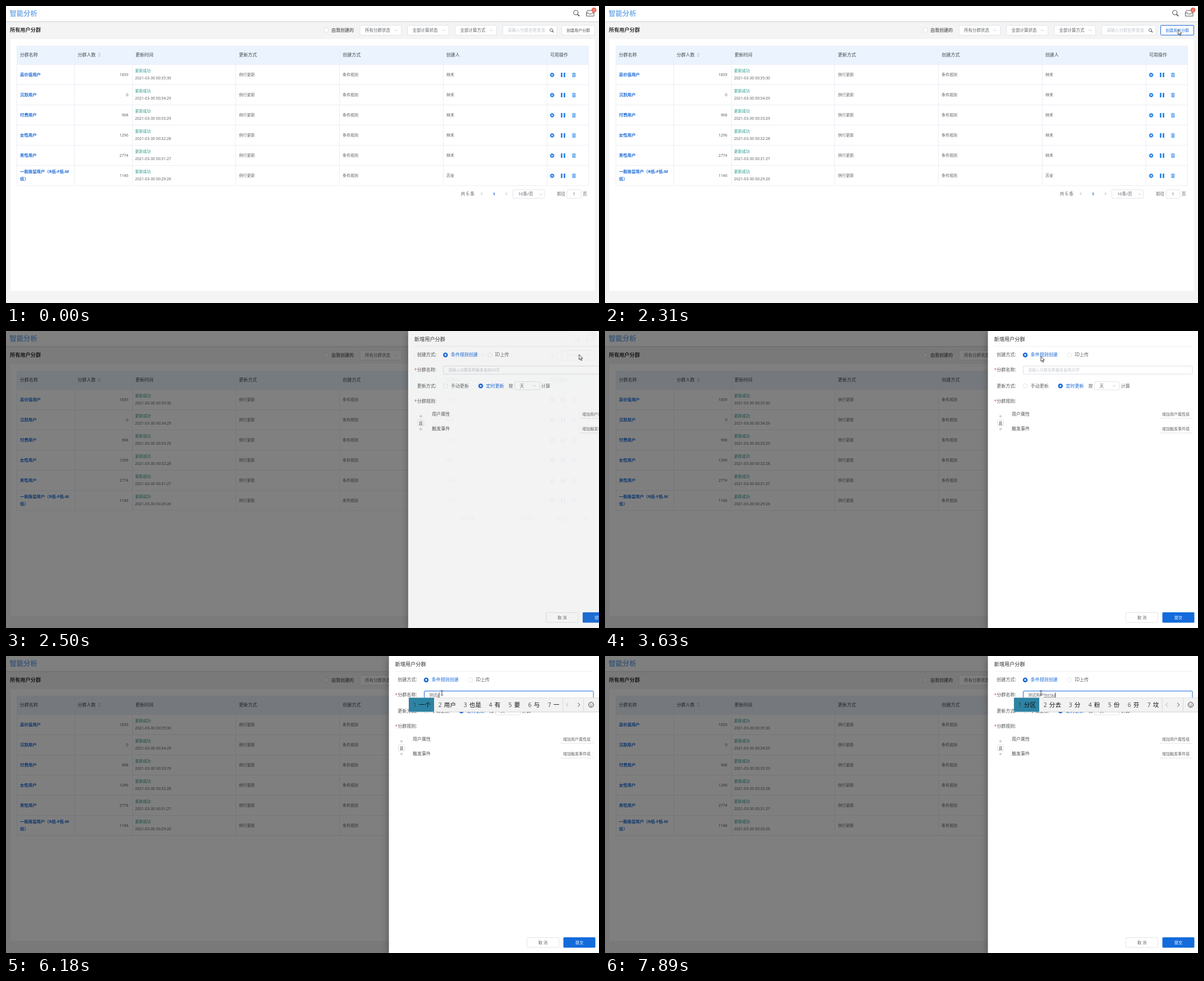
An HTML page for the animation above (8000 ms loop, 1057x530 px).

```html
<!DOCTYPE html>
<html lang="zh-CN">
<head>
<meta charset="utf-8">
<title>智能分析</title>
<style>
html, body { margin: 0; width: 100%; height: 100%; overflow: hidden; background: #f4f4f4; }
svg { display: block; width: 1057px; height: 530px; }
text { font-family: "Noto Sans", "Noto Sans CJK SC", "Noto Sans CJK", sans-serif; white-space: pre; }
.loop { animation: 8s linear infinite; }
#shade { animation-name: shade; }
#drawer { animation-name: drawer; }
#sheet { filter: drop-shadow(0 3px 7px rgba(0, 0, 0, .35)); }
#create rect { animation-name: hover-border; }
#create text { animation-name: hover-text; }
#field { animation-name: focus; }
#arrow { animation-name: arrow; }
#beam { animation-name: beam; }
@keyframes shade {
  0%, 29.04% { opacity: 0; animation-timing-function: ease; }
  31.4%, 100% { opacity: .5; }
}
@keyframes drawer {
  0%, 29.04% { opacity: 0; transform: translateX(375px); animation-timing-function: ease; }
  32.53%, 100% { opacity: 1; transform: none; }
}
@keyframes hover-border {
  0%, 15.2% { stroke: #e1e4e9; }
  16.4%, 100% { stroke: #1a6ad8; }
}
@keyframes hover-text {
  0%, 15.2% { fill: #505256; }
  16.4%, 100% { fill: #1a6ad8; }
}
@keyframes focus {
  0%, 48.9% { stroke: #dcdfe6; animation-timing-function: ease; }
  51.4%, 100% { stroke: #1a6ad8; }
}
@keyframes arrow {
  0%, 1.25% { transform: translate(1037px, 531px); }
  7% { transform: translate(1059px, 384px); }
  11.1% { transform: translate(1059px, 89px); animation-timing-function: ease-out; }
  17.6%, 32.4% { transform: translate(1021.5px, 42px); }
  35% { transform: translate(997px, 57px); animation-timing-function: ease-in-out; }
  40.9%, 45% { transform: translate(777px, 43px); opacity: 1; }
  48.5% { transform: translate(777px, 62px); opacity: 1; }
  48.51%, 100% { transform: translate(777px, 62px); opacity: 0; }
}
@keyframes beam {
  0%, 48.5% { opacity: 0; }
  48.51%, 100% { opacity: 1; }
}
</style>
</head>
<body>
<svg id="stage" viewBox="0 0 1057 530"></svg>
<script>
const BLUE = '#1a6ad8', DARK = '#303133', GRAY = '#606266', PALE = '#c0c4cc', LINE = '#ebeef5', EDGE = '#e1e4e9';

// y is the vertical middle of the text
const text = (x, y, s, size = 7, fill = GRAY, attrs = '') =>
  `<text x="${x}" y="${(y + size * .37).toFixed(2)}" font-size="${size}" fill="${fill}" ${attrs}>${s}</text>`;
const rect = (x, y, w, h, fill = '#fff', attrs = '') =>
  `<rect x="${x}" y="${y}" width="${w}" height="${h}" fill="${fill}" ${attrs}/>`;
const box = (x, y, w, h, attrs = '') => rect(x, y, w, h, '#fff', `rx="1.5" stroke="${EDGE}" ${attrs}`);
const circle = (x, y, r, fill, attrs = '') => `<circle cx="${x}" cy="${y}" r="${r}" fill="${fill}" ${attrs}/>`;
const path = (d, stroke, width = 1, attrs = '') =>
  `<path d="${d}" fill="none" stroke="${stroke}" stroke-width="${width}" ${attrs}/>`;
const chevron = (x, y) => path(`M${x - 2.7} ${y - 1.4}l2.7 2.8l2.7 -2.8`, PALE, .9);
const angle = (x, y, dir, size = 2.2, color = '#a0a4aa') =>
  path(`M${x - dir * size / 2} ${y - size}l${dir * size} ${size}l${-dir * size} ${size}`, color, .9);
const lens = (x, y, r, width) =>
  circle(x, y, r, 'none', `stroke="#555" stroke-width="${width}"`) +
  path(`M${x + r * .7} ${y + r * .7}l${r * .9} ${r * .9}`, '#555', width * 1.5);
const select = (x, y, w, h, label, size) =>
  box(x, y, w, h) + text(x + 9, y + h / 2, label, size) + chevron(x + w - 9.5, y + h / 2);
const radio = (x, y, on) => on
  ? circle(x, y, 4.3, BLUE) + circle(x, y, 1.6, '#fff')
  : circle(x, y, 3.9, '#fff', `stroke="${EDGE}" stroke-width=".9"`);
const middle = 'text-anchor="middle"', bold = 'font-weight="700"', medium = 'font-weight="500"';

const edges = [19, 122, 225, 409.5, 594.5, 779, 964, 1038];
const rows = [
  [['高价值用户'], 1839, '35:30', '林禾'],
  [['沉默用户'], 0, '34:29', '林禾'],
  [['付费用户'], 968, '33:29', '林禾'],
  [['女性用户'], 1296, '32:28', '林禾'],
  [['男性用户'], 2774, '31:27', '林禾'],
  [['一般挽留用户（R低-F低-M', '低）'], 1146, '29:26', '苏安'],
];

function actions(y) {
  return circle(973.5, y, 2.3, 'none', 'stroke="#2f86ea" stroke-width="2.2"') +
    circle(973.5, y, 3.6, 'none', 'stroke="#2f86ea" stroke-width=".9" stroke-dasharray="1.6 1.2"') +
    rect(989, y - 4, 2.8, 8, '#2f86ea') + rect(994, y - 4, 2.8, 8, '#2f86ea') +
    rect(1008.5, y - 3, 7.5, 1.2, '#5ba0ef') + rect(1010.7, y - 4.1, 3, 1, '#5ba0ef') +
    rect(1009.3, y - 1.3, 6, 5.2, '#6dabf1', 'rx=".6"') +
    path(`M1011.2 ${y - .3}v3M1013.4 ${y - .3}v3`, '#fff', .5);
}

function table() {
  let s = rect(19, 71, 1019, 34, '#ebf4fe');
  ['分群名称', '分群人数', '更新时间', '更新方式', '创建方式', '创建人', '可用操作']
    .forEach((label, i) => s += text(edges[i] + 5.8, 87, label, 8, '#45484d', medium));
  s += `<path d="M164 86.2h5l-2.5 -2.7zM164 88.2h5l-2.5 2.7z" fill="${PALE}"/>`;
  rows.forEach(([name, count, time, owner], i) => {
    const y = 122 + 36 * i;
    name.forEach((line, k) =>
      s += text(25, y + (name.length > 1 ? 13 * k - 6.3 : 0), line, 7.4, BLUE, bold));
    s += text(218, y, count, 6.9, GRAY, 'text-anchor="end"') +
      text(230, y - 6.5, '更新成功', 7, '#2c9a8c') +
      text(230, y + 6.7, `2021-03-30 00:${time}`, 6.8) +
      text(415.5, y, '例行更新') + text(600, y, '条件规则') + text(785, y, owner) + actions(y + 1);
  });
  let grid = 'M19 71.5H1038';
  for (let i = 0; i < 7; i++) grid += `M19 ${104.5 + 36 * i}H1038`;
  for (const x of edges) grid += `M${Math.floor(x) + .5} 71V320.5`;
  return s + path(grid, LINE);
}

function page() {
  return rect(0, 0, 1057, 530, '#f4f4f4') + rect(0, 0, 1057, 27) +
    rect(0, 27, 1057, 1, '#dcdcdc') + rect(0, 28, 1057, 1.5, '#ececec') +
    text(6.5, 13, '智能分析', 12.3, '#78aeea', bold) +
    lens(1015.7, 11.8, 4, 1.1) +
    path('M1034.5 12.5l2 -4.5h9l2.5 4.5v5.5h-13.5zM1034.5 12.5h4l1 1.8h4l1 -1.8h3.5', '#555', 1) +
    circle(1048, 7.3, 4.5, '#e8705f') + text(1048, 7.3, '1', 6, '#fff', middle) +
    text(7, 43, '所有用户分群', 9.2, DARK, bold) +
    box(567.5, 39.5, 7, 7) + text(580, 43, '由我创建的', 8, DARK, medium) +
    select(631, 34.5, 73.5, 17.5, '所有分群状态', 7.5) +
    select(715.5, 34.5, 74, 17.5, '全部计算状态', 7.5) +
    select(800.5, 34.5, 74, 17.5, '全部计算方式', 7.5) +
    box(885.5, 34.5, 96.5, 17.5) + text(894, 43.3, '请输入分群名称查询', 7.45, PALE) + lens(972, 43, 2.5, .9) +
    `<g id="create">${box(990.5, 34.5, 59, 17.5, 'class="loop"')}` +
    text(1020, 43.3, '创建用户分群', 7, '#505256', `${middle} class="loop"`) + '</g>' +
    rect(8, 59, 1041.5, 449.5) + table() +
    text(810.5, 335, '共 6 条', 8) + angle(848, 335, -1) +
    text(870, 335, '1', 7.5, BLUE, `${middle} ${bold}`) + angle(892, 335, 1) +
    box(903.5, 328, 56.5, 15) + text(913, 335.5, '10条/页', 7.6) + chevron(953, 336) +
    text(982, 335.5, '前往', 7.6) + box(1000, 328, 25, 15) +
    text(1012.5, 335.5, '1', 7.6, GRAY, middle) + text(1028, 335.5, '页', 7.6);
}

function addButton(y, label) {
  return rect(988, y - 6.5, 59, 14.5, '#e3e3e3', 'rx="1"') + rect(988, y - 7, 58.8, 14, '#fff', 'rx="1"') +
    text(1017.5, y + .3, label, 7, GRAY, middle);
}

function drawer() {
  const label = (y, s, required) =>
    (required ? text(693.5, y + .5, '*', 8, '#e85a5a') : '') + text(698.3, y, s + ':', 8, '#505256');
  return rect(682.5, 0, 380, 530, '#fff', 'id="sheet"') +
    text(693.5, 15, '新增用户分群', 9.2, DARK, medium) + path('M694 27.5H1046', '#f0f0f0') +
    label(42.5, '创建方式') + radio(749, 42.7, true) + text(758.7, 42.5, '条件规则创建', 8, BLUE) +
    radio(828, 42.7) + text(837.5, 42.5, 'ID上传', 8) +
    label(69.5, '分群名称', true) +
    box(745.5, 62.5, 301.5, 14.5, 'id="field" class="loop"') +
    text(754, 69.8, '请输入分群名称最多支持20字', 7, PALE, 'id="hint"') +
    text(754, 69.8, '', 7, GRAY, 'id="typed"') + rect(754, 65, .9, 9, '#222', 'id="caret"') +
    label(97.7, '更新方式') + radio(749, 98) + text(758.7, 97.7, '手动更新', 8) +
    radio(811.8, 98, true) + text(821.5, 97.7, '定时更新', 8, BLUE) + text(861.5, 97.7, '按', 8) +
    select(872.5, 90.5, 44.5, 14.5, '天', 7.5) + text(919.7, 97.7, '计算', 8) +
    label(125.3, '分群规则', true) +
    text(725, 148.3, '用户属性', 8, '#505256') + text(725, 174.5, '触发事件', 8, '#505256') +
    circle(705, 152.3, 2.3, '#d3d5d9') + circle(705, 175, 2.3, '#d3d5d9') +
    box(699.5, 158.5, 11, 11) + text(705, 164, '且', 7, DARK, middle) +
    addButton(148.3, '增加用户属性组') + addButton(174.5, '增加触发事件组') +
    box(928.5, 502.5, 57, 17.5) + text(957, 511.3, '取 消', 7.2, GRAY, middle) +
    rect(993.5, 502, 57, 18.5, '#146bdb', 'rx="1.5"') + text(1022, 511.3, '提交', 7.2, '#fff', middle);
}

const stage = document.getElementById('stage');
stage.innerHTML = page() + rect(0, 0, 1057, 530, '#000', 'id="shade" class="loop"') +
  `<g id="drawer" class="loop">${drawer()}</g><g id="ime"></g>` +
  '<g id="arrow" class="loop"><path d="M0 0V9.2L2.1 7.3L3.6 10.6L5 10L3.6 6.8H6.4Z" fill="#fff" stroke="#111" stroke-width=".8"/></g>' +
  `<g id="beam" class="loop">${path('M775 62h1.4l.6 .6l.6 -.6h1.4M777 62.5v7M775 70h1.4l.6 -.6l.6 .6h1.4', '#222', .9)}</g>`;

function candidateBar(left, words) {
  let x = left, items = '';
  words.forEach((word, i) => {
    const w = 25 + 10 * word.length;
    if (!i) items += rect(x, 74.5, w, 25, '#2d83a3');
    items += text(x + 7.7, 87, i + 1, 10.3, i ? '#555' : '#1d4c5d') +
      text(x + 17.8, 87, word, 10.6, '#111');
    x += w;
  });
  const w = x - left + 64;
  return rect(left, 76, w, 25.5, '#000', 'opacity=".06"') +
    rect(left, 74.5, w, 25, '#f2f2f2', 'stroke="#d9d9d9" stroke-width=".8"') + items +
    path(`M${x - .5} 75V99.5M${x + 36.5} 75V99.5`, '#dadada') +
    angle(x + 7.5, 87, -1, 3.5, '#aaa') + angle(x + 28, 87, 1, 3.5, '#333') +
    circle(x + 50, 87, 4.6, 'none', 'stroke="#333" stroke-width=".9"') +
    circle(x + 48.3, 85.8, .7, '#333') + circle(x + 51.7, 85.8, .7, '#333') +
    path(`M${x + 47.6} 88.3q2.4 2.6 4.8 0`, '#333', .8);
}

// start time, committed text, pinyin being composed, bar position, candidates
const typing = [
  [0, '', ''],
  [5260, '', 'c'],
  [5290, '', 'c', 749, '才 从 出 次 成 吃 车'],
  [5320, '', 'ce', 749, '侧 测 册 策 厕 恻 齰'],
  [5620, '', "ce's", 677, '测试 厕所 测算 测速 策使 侧身 侧室'],
  [5720, '', "ce'sh", 677, '测试 侧身 测试 策士 侧室 侧视 测深'],
  [5820, '', "ce'shi", 677, '测试 侧室 侧视 策士 测时 册市 策试'],
  [5970, '测试', ''],
  [6180, '测试', 'y', 718, '一个 用户 也是 有 要 与 一'],
  [6300, '测试', 'yo', 718, '用户 有的 由于 有 又 由 哟'],
  [6360, '测试', 'yon', 718, '用户 用于 拥有 用 永 勇 涌'],
  [6540, '测试', 'yong', 718, '用户 用于 拥有 用 永 勇 涌'],
  [6690, '测试', "yong'h", 677, '用户 拥护 用好 永恒 用化 永和 用后'],
  [7020, '测试', "yong'hu", 677, '用户 拥护 永湖 用 永 勇 涌'],
  [7160, '测试用户', ''],
  [7310, '测试用户', 'f', 749, '发 分 放 非 房 份 飞'],
  [7400, '测试用户', 'fe', 749, '分 非 份 飞 费 风 封'],
  [7520, '测试用户', 'fen', 749, '分 份 粉 奋 坟 纷 芬'],
  [7660, '测试用户', "fen'q", 677, '分区 分钱 分清 分期 分歧 分权 粉墙'],
  [7850, '测试用户', "fen'qu", 677, '分区 分去 分 粉 份 芬 坟'],
  [7890, '测试用户', "fen'qu", 729, '分区 分去 分 粉 份 芬 坟'],
];

const [typed, hint, caret, ime] = ['typed', 'hint', 'caret', 'ime'].map(id => document.getElementById(id));
let shown, start;

function show([, done, pinyin, left, words]) {
  typed.innerHTML = `${done}<tspan text-decoration="underline">${pinyin}</tspan>`;
  const empty = !(done + pinyin);
  hint.style.display = empty ? '' : 'none';
  caret.setAttribute('x', 754 + (empty ? 0 : typed.getComputedTextLength()));
  ime.innerHTML = words ? candidateBar(left, words.split(' ')) : '';
}

function tick(now) {
  start ??= now;
  const t = (now - start) % 8000;
  const state = typing.findLast(([from]) => t >= from);
  if (state !== shown) show(shown = state);
  caret.style.opacity = t >= 3910 && (t < 4470 || t >= 5030) ? 1 : 0;
  requestAnimationFrame(tick);
}
requestAnimationFrame(tick);
</script>
</body>
</html>
```
